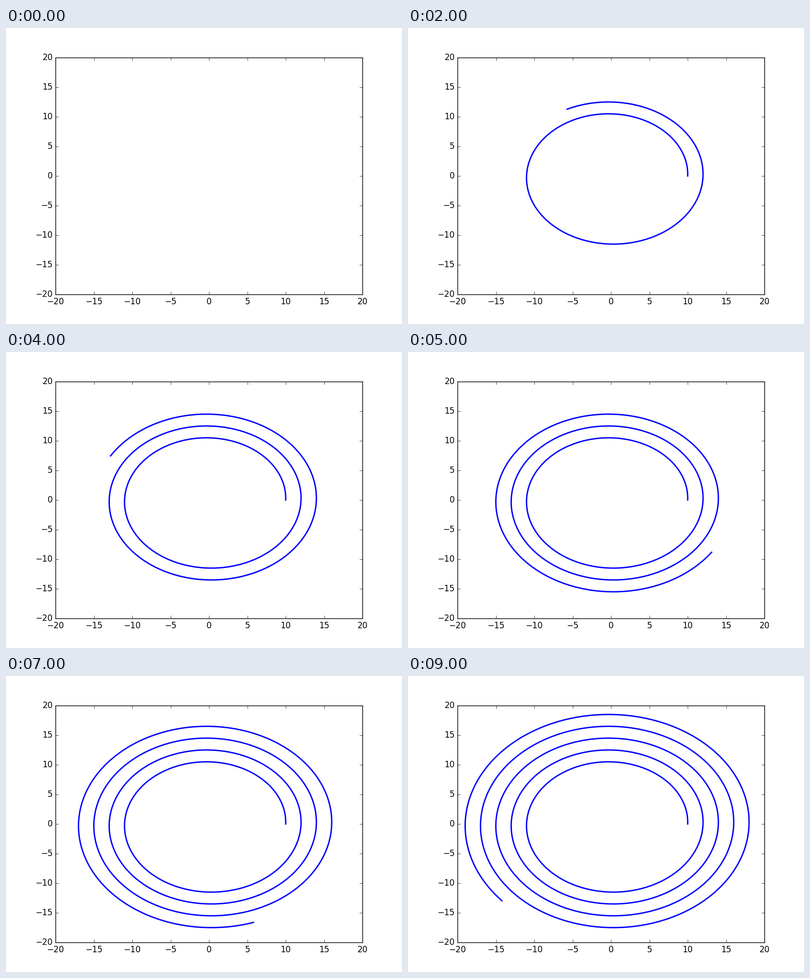
A matplotlib script that plays this animation: 800x600 px, repeating every 10 s.

```python
import numpy as np
import matplotlib.pyplot as plt
from matplotlib.animation import FuncAnimation

FRAMES = 10
STEP_MS = 1000
START_RADIUS = 10

plt.style.use("classic")
plt.rcParams.update({
    "font.family": "DejaVu Sans",
    "figure.facecolor": "white",
    "savefig.facecolor": "white",
    "savefig.dpi": 100,
})

fig = plt.figure(figsize=(8, 6), dpi=100)
ax = fig.add_subplot(xlim=(-20, 20), ylim=(-20, 20))
line, = ax.plot([], [], color="blue", lw=2)


def spiral(seconds):
    """Spiral gaining 2 units per turn, traced at an even pen speed."""
    end = np.sqrt(START_RADIUS ** 2 + 30 * seconds)
    r = np.linspace(START_RADIUS, end, 200 * seconds)
    angle = np.pi * (r - START_RADIUS)
    return r * np.cos(angle), r * np.sin(angle)


def init():
    line.set_data([], [])
    return line,


def update(frame):
    line.set_data(*spiral(frame))
    return line,


anim = FuncAnimation(fig, update, frames=FRAMES, init_func=init,
                     interval=STEP_MS, repeat=True, repeat_delay=0)
plt.show()
```
